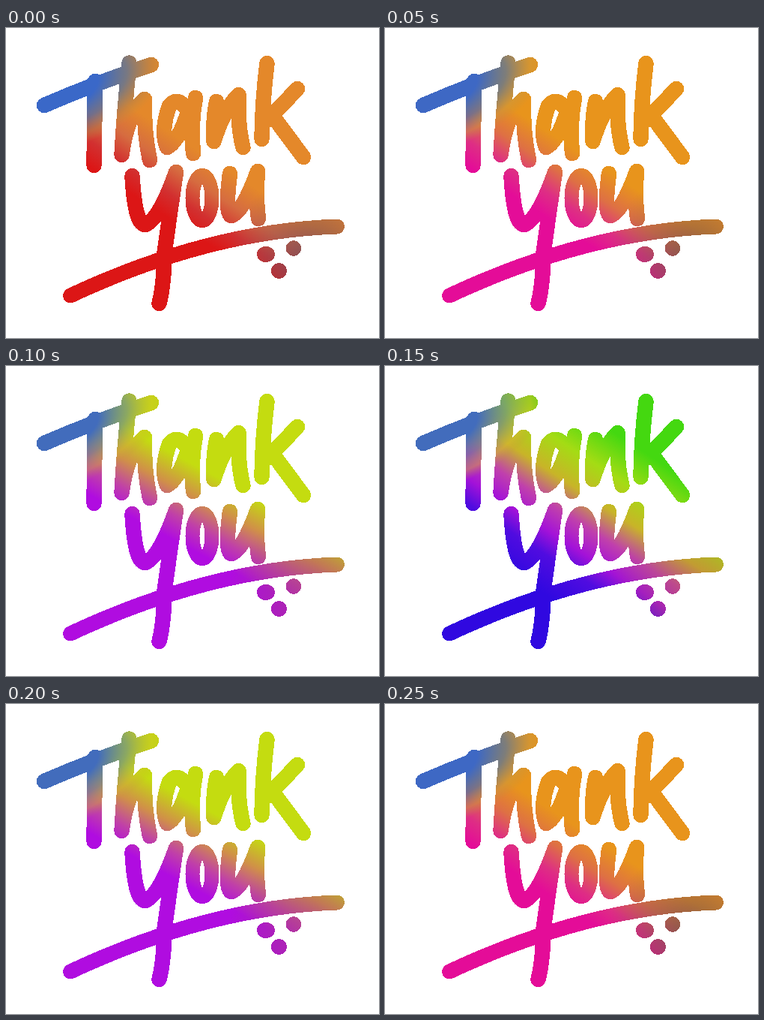
These frames come from a looping animation (498 by 413 pixels, 0.3 s). An HTML page:

```html
<!DOCTYPE html>
<html lang="en">
<head>
<meta charset="utf-8">
<title>Thank you</title>
<style>
html, body { margin: 0; width: 100%; height: 100%; overflow: hidden; background: #fff; }
svg { display: block; width: 498px; height: 413px; animation: hues 300ms step-end infinite; }

/* --c1..--c7 run from lower left to upper right; --sky and --dusk tint two corners */
@keyframes hues {
  0%, 100% {
    --c1: #dc1616; --c2: #dc1616; --c3: #d23030; --c4: #d66c40; --c5: #e4882a; --c6: #e4882a; --c7: #e4882a;
    --sky: #3a68c8; --skyMid: #4070b0a8; --skyFar: #b0804c80; --dusk: #70485cc0; --tilt: 8.5deg;
  }
  16.667%, 83.333% {
    --c1: #e40c98; --c2: #e40c98; --c3: #de2e84; --c4: #de7044; --c5: #e8941c; --c6: #e8941c; --c7: #e8941c;
    --sky: #3e68c4; --skyMid: #4070b0a0; --skyFar: #c8984080; --dusk: #70504cc0; --tilt: 8.5deg;
  }
  33.333%, 66.667% {
    --c1: #b00ce0; --c2: #b00ce0; --c3: #c040a8; --c4: #d09048; --c5: #c4dc10; --c6: #c4dc10; --c7: #c4dc10;
    --sky: #426cbc; --skyMid: #6080a090; --skyFar: #d0b83050; --dusk: #b0487880; --tilt: 2deg;
  }
  50% {
    --c1: #3008e0; --c2: #500ce0; --c3: #a412d8; --c4: #c040ac; --c5: #c8b428; --c6: #a4dc14; --c7: #44d810;
    --sky: #426cbc; --skyMid: #6080a090; --skyFar: #d8b83070; --dusk: #c0604866; --tilt: 8.5deg;
  }
}
.c1 { stop-color: var(--c1); }
.c2 { stop-color: var(--c2); }
.c3 { stop-color: var(--c3); }
.c4 { stop-color: var(--c4); }
.c5 { stop-color: var(--c5); }
.c6 { stop-color: var(--c6); }
.c7 { stop-color: var(--c7); }
.sky { stop-color: var(--sky); }
.sky-mid { stop-color: var(--skyMid); }
.sky-far { stop-color: var(--skyFar); }
.dusk { stop-color: var(--dusk); }
.sweep { transform-origin: 0 0; transform: skewY(var(--tilt)); }
</style>
</head>
<body>
<svg viewBox="0 0 498 413" role="img" aria-label="Thank you">
  <defs>
    <linearGradient id="sweep" gradientUnits="userSpaceOnUse" x1="150" y1="250" x2="270" y2="10">
      <stop class="c1" offset=".033"/>
      <stop class="c2" offset=".21"/>
      <stop class="c3" offset=".323"/>
      <stop class="c4" offset=".45"/>
      <stop class="c5" offset=".593"/>
      <stop class="c6" offset=".757"/>
      <stop class="c7" offset=".95"/>
    </linearGradient>
    <radialGradient id="sky" gradientUnits="userSpaceOnUse" cx="0" cy="0" r="1"
      gradientTransform="translate(70 82) rotate(-20.5) scale(155 80)">
      <stop class="sky" offset=".36"/>
      <stop class="sky-mid" offset=".62"/>
      <stop class="sky-far" offset=".84"/>
      <stop offset="1" stop-color="#c09040" stop-opacity="0"/>
    </radialGradient>
    <radialGradient id="dusk" gradientUnits="userSpaceOnUse" cx="410" cy="310" r="115">
      <stop class="dusk" offset=".1"/>
      <stop offset="1" stop-color="#905058" stop-opacity="0"/>
    </radialGradient>

    <mask id="lettering" maskUnits="userSpaceOnUse" x="0" y="0" width="498" height="413">
      <g fill="none" stroke="#fff" stroke-width="20.5" stroke-linecap="round" stroke-linejoin="round"
        shape-rendering="crispEdges">
        <!-- T -->
        <path d="M51 103Q120 73 194 49M119 71L117.5 183"/>
        <!-- h -->
        <path d="M164.5 46.5Q158 110 154.5 169Q162 115 185 95Q184 140 192 176"/>
        <!-- a -->
        <path d="M240 106Q228 91 218 104Q206 138 215 159Q230 152 243 112M253 93Q246 130 250 167"/>
        <!-- n -->
        <path d="M281 98Q276 125 277.5 151Q290 110 310.5 89Q309 130 316.5 159"/>
        <!-- k -->
        <path d="M348.5 47Q342 100 341.5 148M389 81L350 122M356 117L397 172"/>
        <!-- y -->
        <path d="M168.5 197Q172 262 186 262Q205 255 227 192Q219 245 211.5 300Q211 342 204.5 367"/>
        <!-- o -->
        <ellipse cx="262" cy="226.5" rx="13" ry="30" stroke-width="19"/>
        <!-- u -->
        <path d="M299 194Q292 248 301 250Q316 246 336 191Q333 225 337 254"/>
        <!-- swoosh -->
        <path d="M86 356.5Q270 270.5 442 264.5" stroke-width="20"/>
        <g fill="#fff" stroke="none">
          <ellipse cx="347" cy="301.5" rx="12" ry="10.5"/>
          <circle cx="384" cy="293.5" r="10.3"/>
          <circle cx="364.5" cy="323.5" r="10.5"/>
        </g>
      </g>
    </mask>
  </defs>

  <g mask="url(#lettering)">
    <rect class="sweep" y="-100" width="498" height="520" fill="url(#sweep)"/>
    <rect width="498" height="413" fill="url(#dusk)"/>
    <rect width="498" height="413" fill="url(#sky)"/>
  </g>
</svg>
</body>
</html>
```
